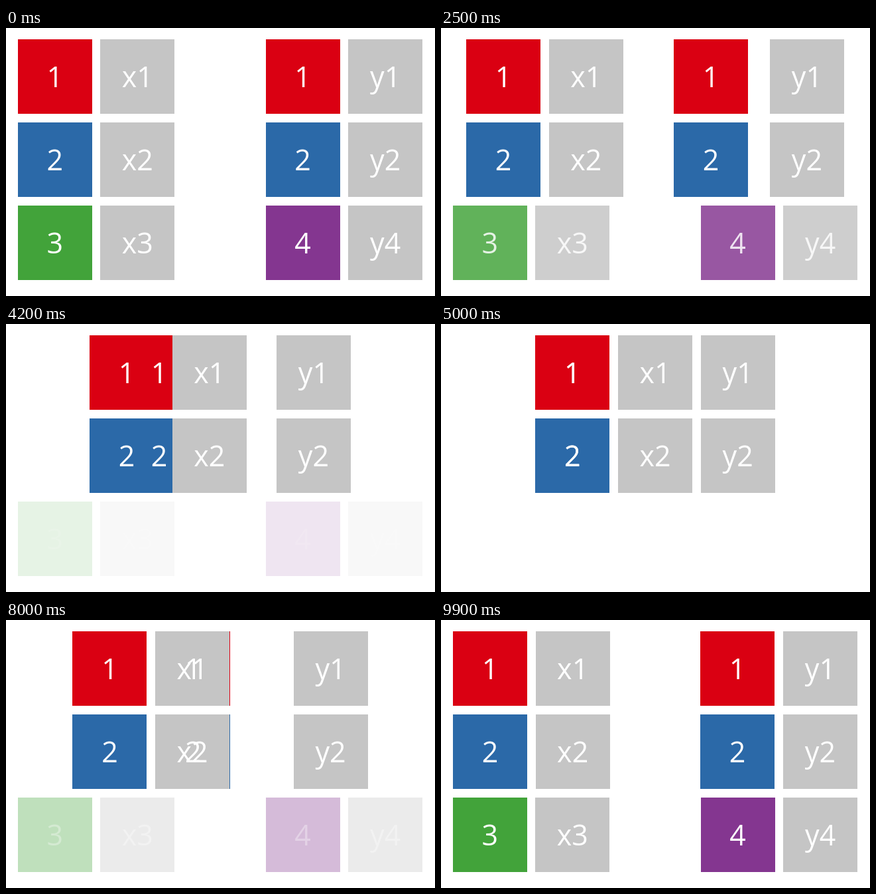
Write an HTML page with a canvas that moves like this. It is 647 by 403 pixels and loops after 10000 ms.

```html
<!DOCTYPE html>
<html lang="en">
<head>
<meta charset="utf-8">
<title>Inner join</title>
<style>
  html, body { margin: 0; width: 100%; height: 100%; overflow: hidden; background: #fff; }
  canvas { display: block; }
</style>
</head>
<body>
<canvas id="stage" width="647" height="403"></canvas>
<script>
const ctx = document.getElementById('stage').getContext('2d');
const LOOP = 10000, STEP = 100;
const LEFT = 17.8, PITCH = 124.6, SIZE = 112;
const ROWS = [17, 142, 267];
const GREY = '#c5c5c5', RED = '#da0012', BLUE = '#2b69a8', GREEN = '#42a33a', PURPLE = '#843690';

// Columns are counted in tile pitches: [start, joined]
const X_KEY = [0, 1], X_VAL = [1, 2], Y_KEY = [3, 1], Y_VAL = [4, 3];

const tile = (text, fill, row, [from, to], matched = true) => ({ text, fill, row, from, to, matched });

const tiles = [
  tile('1', RED, 0, X_KEY),
  tile('2', BLUE, 1, X_KEY),
  tile('3', GREEN, 2, X_KEY, false),
  tile('1', RED, 0, Y_KEY),
  tile('2', BLUE, 1, Y_KEY),
  tile('4', PURPLE, 2, Y_KEY, false),
  tile('x1', GREY, 0, X_VAL),
  tile('x2', GREY, 1, X_VAL),
  tile('x3', GREY, 2, X_VAL, false),
  tile('y1', GREY, 0, Y_VAL),
  tile('y2', GREY, 1, Y_VAL),
  tile('y4', GREY, 2, Y_VAL, false),
];

function ease(t, start, end) {
  const u = Math.min(1, Math.max(0, (t - start) / (end - start)));
  return (1 - Math.cos(Math.PI * u)) / 2;
}

// 0 = separate tables, 1 = joined
const joined = t => ease(t, 1600, 5000) - ease(t, 6700, LOOP);

function draw(t) {
  const p = joined(t);
  const left = d => LEFT + PITCH * (d.from + (d.matched ? p * (d.to - d.from) : 0));
  const alpha = d => d.matched ? 1 : 1 - p;

  ctx.globalAlpha = 1;
  ctx.fillStyle = '#fff';
  ctx.fillRect(0, 0, 647, 403);

  for (const d of tiles) {
    ctx.globalAlpha = alpha(d);
    ctx.fillStyle = d.fill;
    ctx.fillRect(Math.round(left(d)), ROWS[d.row], SIZE, SIZE);
  }

  ctx.fillStyle = '#fff';
  ctx.font = '43px "Fira Sans", "Open Sans", "Noto Sans", sans-serif';
  ctx.textAlign = 'center';
  for (const d of tiles) {
    ctx.globalAlpha = alpha(d);
    ctx.fillText(d.text, left(d) + SIZE / 2, ROWS[d.row] + 72);
  }
}

const begin = performance.now();
function frame() {
  const t = (performance.now() - begin) % LOOP;
  draw(Math.floor(t / STEP) * STEP);
  requestAnimationFrame(frame);
}
frame();
</script>
</body>
</html>
```
